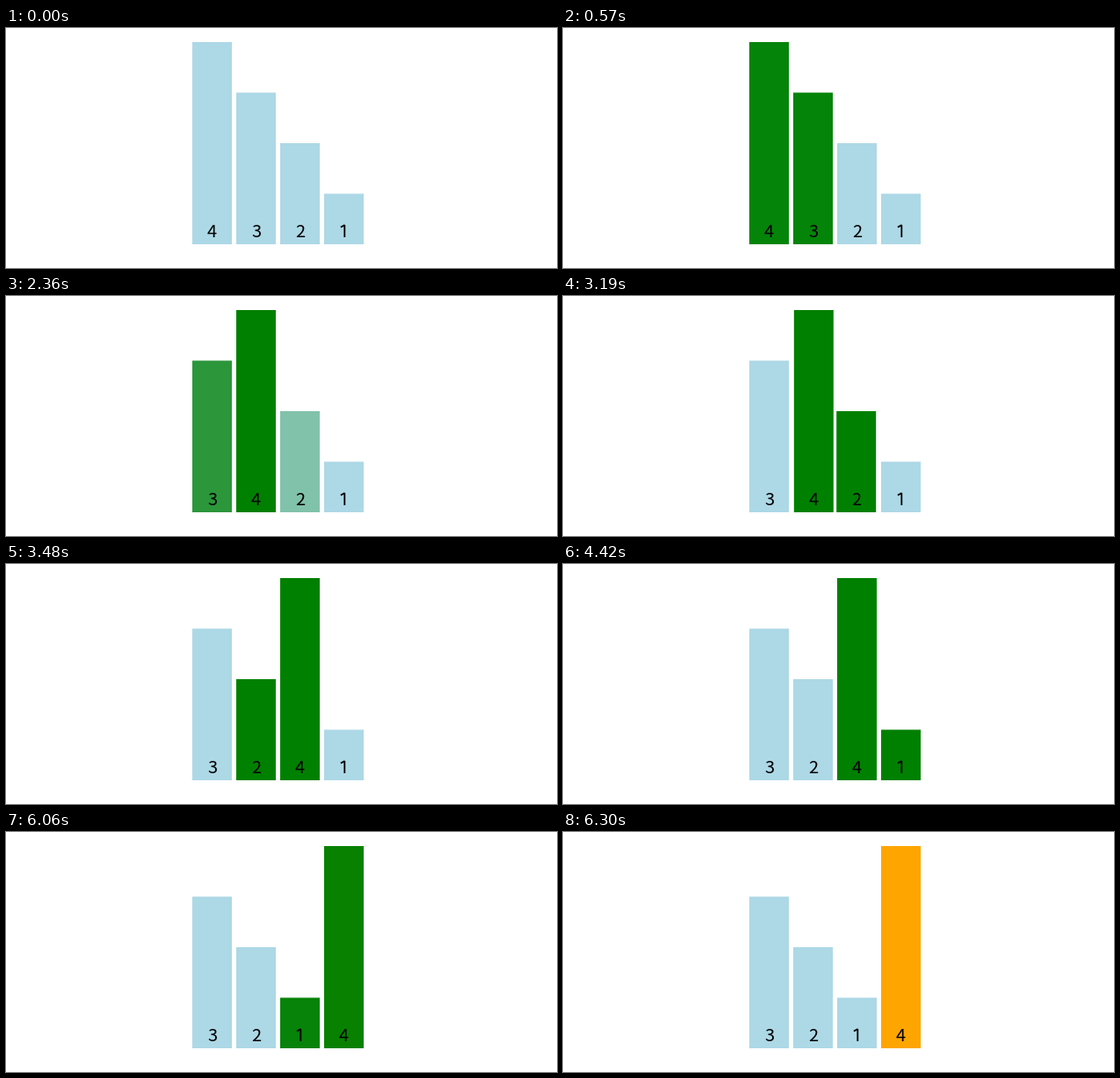
Animation of 627 by 273 pixels, one loop 8000 ms. Source, as a matplotlib script:

```python
import numpy as np
import matplotlib.pyplot as plt
from matplotlib.animation import FuncAnimation
from matplotlib.colors import to_rgb
from matplotlib.patches import Rectangle

W, H, DPI = 627, 273, 64
LOOP, STEP = 8000, 20
PT = 72 / DPI                      # points per pixel

LEFT, PITCH, BAR_W = 212, 50, 45
FLOOR, UNIT, BASELINE = 246, 57.5, 238

COLORS = {
    "b": to_rgb("#add8e6"),
    "n": to_rgb("#05840a"),
    "g": to_rgb("#008000"),
    "o": to_rgb("#ffa500"),
}

# Bars are listed by value 4, 3, 2, 1: slot of each, colour of each
START = ((0, 1, 2, 3), "bbbb")
# start ms, end ms, visible steps, new slots, new colours
MOVES = [
    (410, 570, 3, (0, 1, 2, 3), "nnbb"),
    (1380, 1550, 4, (1, 0, 2, 3), "ggbb"),
    (2270, 2500, 4, (1, 0, 2, 3), "gbgb"),
    (3190, 3480, 5, (2, 0, 1, 3), "gbgb"),
    (4140, 4420, 5, (2, 0, 1, 3), "gbbg"),
    (5140, 5340, 4, (3, 0, 1, 2), "gbbg"),
    (6060, 6300, 4, (3, 0, 1, 2), "obbb"),
]


def ease(u):
    u = u ** 1.6
    return u * u * (3 - 2 * u)


def progress(t, start, end, steps):
    if t < start:
        return 0.0
    if t >= end:
        return 1.0
    done = 1 + int((t - start) * (steps - 1) / (end - start))
    return ease(done / steps)


def pose(t):
    """Slots and colours of all bars at time t."""
    slots = np.array(START[0], float)
    tints = np.array([COLORS[c] for c in START[1]])
    for start, end, steps, new_slots, new_tints in MOVES:
        p = progress(t, start, end, steps)
        slots += p * (np.array(new_slots) - slots)
        tints += p * (np.array([COLORS[c] for c in new_tints]) - tints)
    return slots, tints


class Bar:
    def __init__(self, ax, value):
        self.value = value
        z = 10 - 2 * value
        top = FLOOR - UNIT * value
        self.box = Rectangle((0, top), BAR_W, UNIT * value, lw=0,
                             snap=False, zorder=z)
        ax.add_patch(self.box)
        if value == 1:             # plain digit without a foot
            self.label, = ax.plot([], [], color="black", lw=1.8 * PT,
                                  solid_capstyle="butt",
                                  solid_joinstyle="miter", zorder=z + 1)
        else:
            self.label = ax.text(0, BASELINE, str(value), color="black",
                                 family="Noto Sans CJK JP", size=20 * PT,
                                 ha="center", va="baseline", zorder=z + 1)

    def place(self, slot, tint):
        x = LEFT + PITCH * slot
        mid = x + BAR_W / 2
        self.box.set_x(x)
        self.box.set_facecolor(tint)
        if self.value == 1:
            self.label.set_data([mid - 3.6, mid + 0.8, mid + 0.8],
                                [226.6, 224.2, BASELINE])
        else:
            self.label.set_x(mid)


fig = plt.figure(figsize=(W / DPI, H / DPI), dpi=DPI, facecolor="white")
ax = fig.add_axes([0, 0, 1, 1])
ax.set_xlim(0, W)
ax.set_ylim(H, 0)
ax.axis("off")
bars = [Bar(ax, v) for v in (4, 3, 2, 1)]


def draw(frame):
    slots, tints = pose(frame * STEP + STEP / 2)
    for bar, slot, tint in zip(bars, slots, tints):
        bar.place(slot, tint)
    return []


anim = FuncAnimation(fig, draw, frames=LOOP // STEP, interval=STEP,
                     init_func=lambda: draw(0), repeat=True, repeat_delay=0)
plt.show()
```
